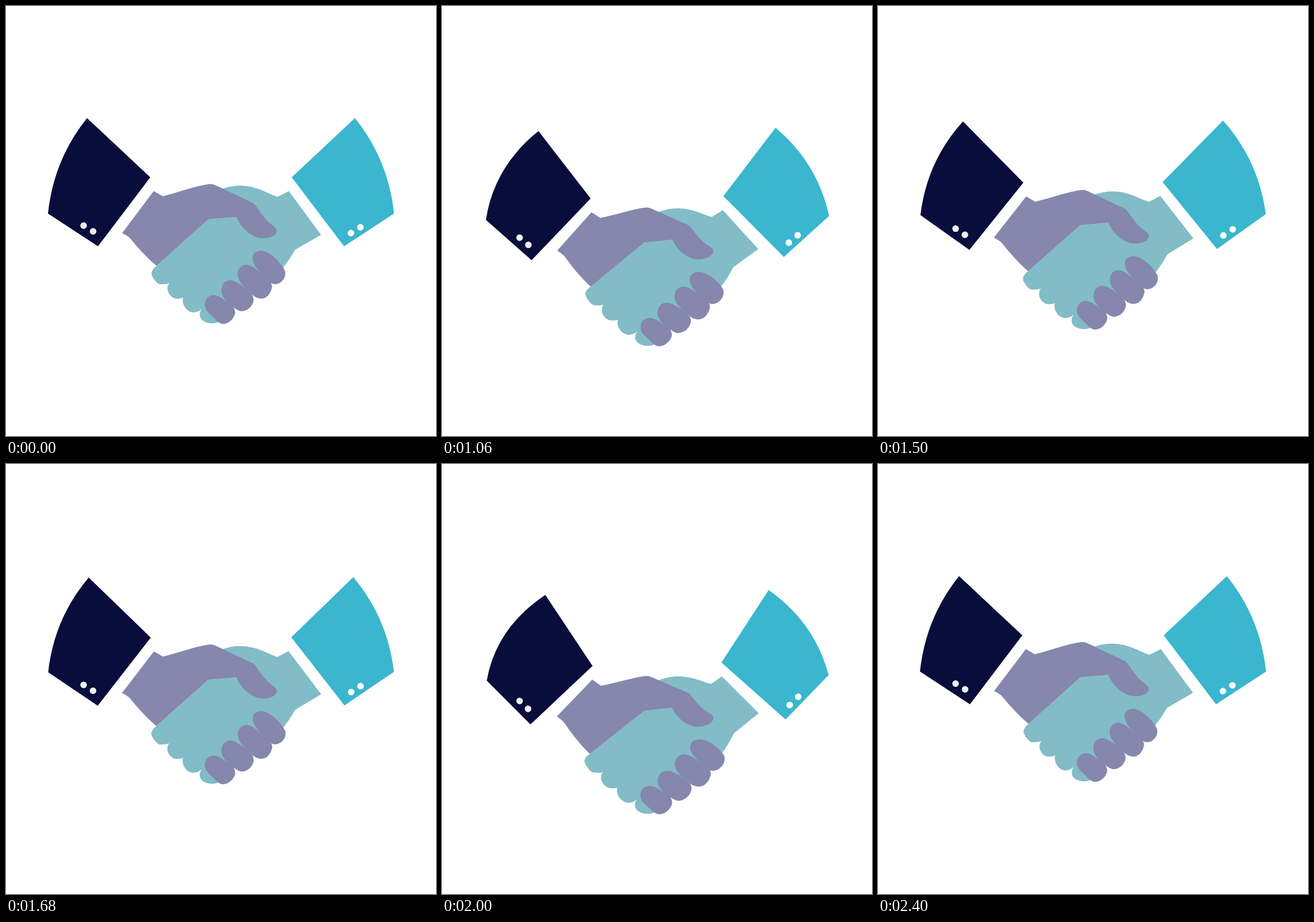
Recreate the animation shown at these times as an HTML page. Size 748 by 748 pixels, loop 2680 ms.

```html
<!DOCTYPE html>
<html lang="en">
<head>
<meta charset="utf-8">
<title>Handshake</title>
<style>
  html, body { margin: 0; width: 100%; height: 100%; overflow: hidden; background: #fff; }
  svg { display: block; width: 100%; height: 100%; }
  .navy { fill: #090d3b; }
  .cyan { fill: #3ab6ce; }
  .purple { fill: #8587ac; }
  .teal { fill: #82bcc7; }
  .stud { fill: none; stroke: #fff; stroke-width: 11.5; stroke-linecap: round; }
  .stud.dim { stroke: #f0f2f1; }
</style>
</head>
<body>
<svg viewBox="0 0 748 748">
  <!-- sleeves and studs: data-low holds the lowered pose -->
  <path class="navy" d="M73,361 Q83,267 141,195 L251,298 L160,418 Z"
    data-low="M77,374 Q92,282 173,222 L260,342 L155,447 Z"/>
  <path class="cyan" d="M675,361 Q665,267 607,195 L497,298 L588,418 Z"
    data-low="M673,366 Q651,274 575,215 L488,337 L596,440 Z"/>
  <path class="stud dim" d="M135,382 L135,382 M151.5,392 L151.5,392"
    data-low="M135,407 L135,407 M150,420 L150,420"/>
  <path class="stud" d="M600,395 L600,395 M616.5,385 L616.5,385"
    data-low="M604,415 L604,415 M619,401.5 L619,401.5"/>

  <!-- right hand -->
  <path class="teal" d="M376,318 C395,311 415,311 432,316 C447,320 458,327 472,332 L492,322 L548,398
    L503,424 Q494,440 482,455 L450,478 L420,500 L390,522 L372,548
    Q367,552 359,552 C345,552 337,545 337,537 Q337,532 340,527
    C336,531 331,533 325,533 C314,532 305,519 308,507
    C305,509 300,509 296,509 C286,508 280,497 281,490 Q281,486 284,482
    C279,484 274,484 267,484 C262,482 253,471 253,465 Q254,458 262,452 L352,371 L401,367 Z"/>

  <!-- left hand and its fingers -->
  <path class="purple" d="M257,322 L273,331 C300,324 330,313 352,310 Q359,309 365,312 L432,344
    C440,355 450,371 459,378 C465,383 472,387 471,392 C470,400 459,404 447,404
    C427,404 407,384 401,367 L352,371 L262,452 Q240,434 215,403 Q210,399 202,395 Z"/>
  <path class="purple" d="M429,437 C430,429 437,425 446,426 C462,429 480,449 485,460
    C489,472 479,484 468,484 Q464,484 461,482 L450,471 C441,463 428,450 429,437 Z
    M403,464 C404,455 411,449 420,450 C431,452 440,463 450,471 L461,482
    Q464,488 462,492 C459,503 452,509 444,509 Q436,509 428,502 L421,494 C412,488 402,476 403,464 Z"/>
  <path class="purple" d="M375,491 C376,482 383,476 392,477 C403,479 412,488 421,494 L428,502
    Q432,509 430,515 C427,525 418,531 409,531 Q403,530 396,524 L386,516 C380,510 373,501 375,491 Z
    M346,518 C347,508 354,503 362,503 C372,504 379,511 386,516 L396,524
    Q400,533 398,537 C394,547 386,553 377,553 Q371,552 367,548 L354,535 Q345,527 346,518 Z"/>
</svg>
<script>
  const LOOP = 2680, STEP = 20, START = 810, SHAKE = 800, SHAKES = 2;
  const PEAK = 1.212; // how far a shake goes past the lowered pose

  const pair = /([\d.]+),([\d.]+)/g;
  const points = d => [...d.matchAll(pair)].map(m => [+m[1], +m[2]]);

  // The clasped hands sink and bow, spreading below the middle line.
  function bend([x, y]) {
    const u = (x - 355) / 100;
    return [
      x + 0.045 * (x - 365) * Math.tanh((y - 380) / 60),
      y + 48 - 5 * u * u + 0.008 * (400 - y)
    ];
  }

  const parts = [...document.querySelectorAll('path')].map(el => {
    const d = el.getAttribute('d');
    const rest = points(d);
    const low = el.dataset.low ? points(el.dataset.low) : rest.map(bend);
    return { el, d, rest, low };
  });

  function drop(t) {
    const p = (t - START) / SHAKE;
    return p > 0 && p < SHAKES ? PEAK * Math.sin(Math.PI * p) ** 2 : 0;
  }

  function pose(k) {
    const mix = (a, b) => (a + (b - a) * k).toFixed(2);
    for (const { el, d, rest, low } of parts) {
      let i = 0;
      el.setAttribute('d', d.replace(pair, () => {
        const [x, y] = rest[i], [lx, ly] = low[i++];
        return mix(x, lx) + ',' + mix(y, ly);
      }));
    }
  }

  const begin = performance.now();
  function tick() {
    const t = (performance.now() - begin) % LOOP;
    pose(drop(Math.floor(t / STEP) * STEP));
    requestAnimationFrame(tick);
  }
  tick();
</script>
</body>
</html>
```
